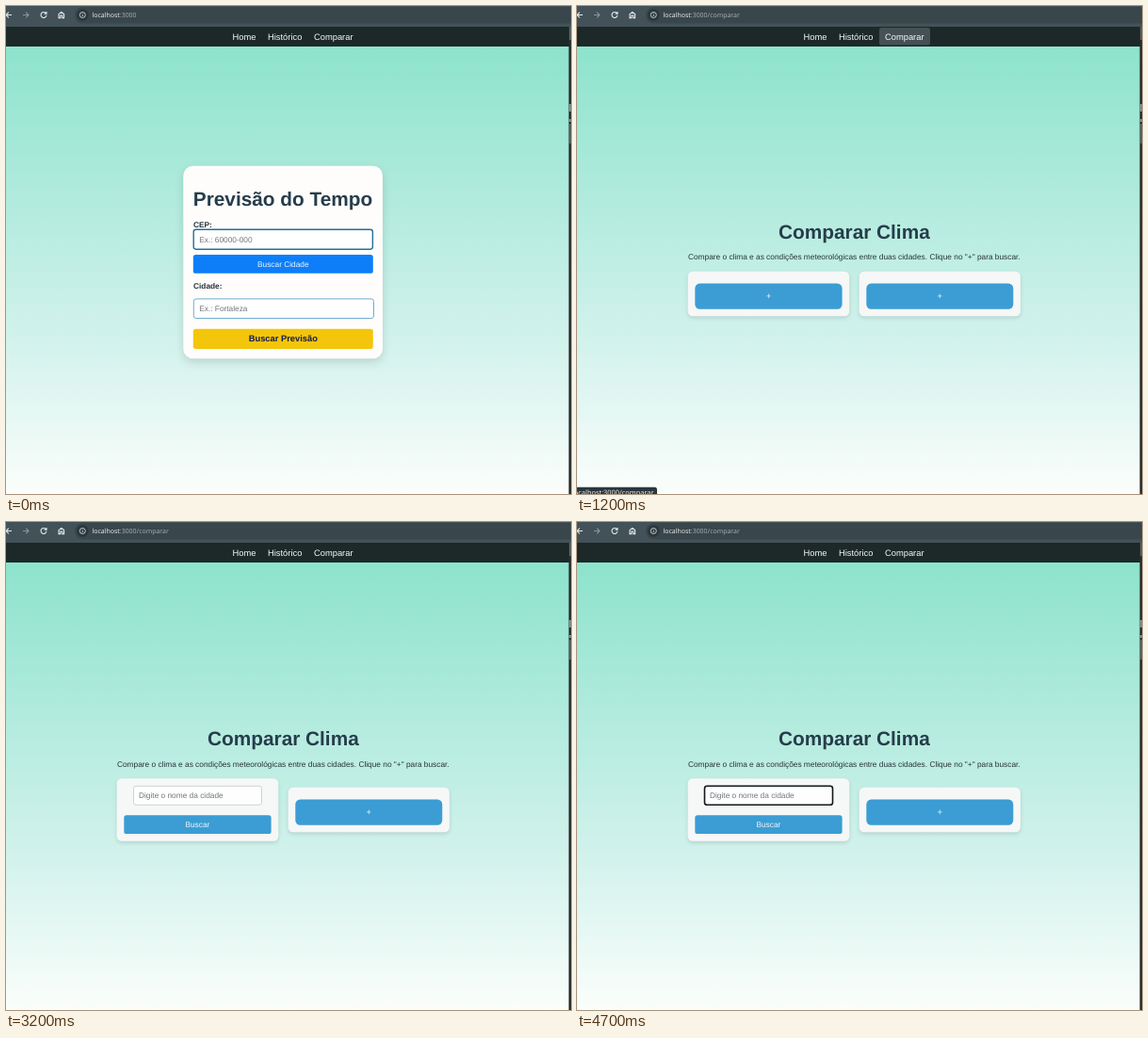
An HTML page for the animation above (5.3 s loop, 600 by 518 pixels).

```html
<!DOCTYPE html>
<html lang="pt-BR">
<head>
<meta charset="utf-8">
<title>Previsão do Tempo</title>
<style>
  html, body { margin: 0; width: 100%; height: 100%; overflow: hidden; background: #fbfefb; }
  svg { display: block; width: 100%; height: 100%; }
  text { font: 8.32px "Liberation Sans", Arial, sans-serif; fill: #263338; text-rendering: geometricPrecision; }
  .title { font-size: 20.8px; font-weight: bold; fill: #263d4b; }
  .nav text { font-size: 9.36px; fill: #f4f8f8; }
  .bold { font-weight: bold; }
  .mid { text-anchor: middle; }
  .hint { fill: #727577; }
  .light { fill: #f1f7fb; }
  .url { font: 6.95px "Noto Sans", "Open Sans", sans-serif; fill: #e6ebed; }
  .icon { fill: none; stroke: #e4eaec; stroke-width: 1.1; }
  .panel { fill: #f6f7f7; filter: drop-shadow(0 2px 2px rgba(0, 0, 0, .12)); }
  .blue { fill: #3b9dd4; }
  .dark { fill: #2f83b3; }
</style>
</head>
<body>
<svg viewBox="0 0 600 518">
  <defs>
    <linearGradient id="sky" x2="0" y2="1">
      <stop offset="0" stop-color="#8de3cc"/>
      <stop offset=".69" stop-color="#d6f3ee"/>
      <stop offset="1" stop-color="#fbfefb"/>
    </linearGradient>
  </defs>
  <rect y="43" width="598" height="475" fill="url(#sky)"/>

  <!-- browser bar -->
  <rect width="600" height="22" fill="#435258"/>
  <rect x="73" y="1" width="560" height="17.5" rx="8.7" fill="#39464b"/>
  <circle cx="81.3" cy="9.5" r="6.3" fill="#2b373c"/>
  <g class="icon">
    <path d="M6 9.5H0M2.8 6.7L0 9.5l2.8 2.8"/>
    <path d="M18 9.5h6M21.2 6.7L24 9.5l-2.8 2.8" stroke="#87959a"/>
    <path d="M42.4 7.6A3 3 0 1 0 43 9.8M43 6v2.3h-2.4"/>
    <path d="M56 8.6L58.8 6.4 61.6 8.6V12.6H59.8V10H57.8V12.6H56Z"/>
    <circle cx="81.3" cy="9.5" r="3" stroke-width=".8"/>
    <path d="M81.3 9.2v1.9M81.3 7.6v.8" stroke-width=".8"/>
  </g>
  <text class="url" x="91.5" y="12">localhost<tspan fill="#a3adb0">:3000<tspan id="path">/comparar</tspan></tspan></text>

  <!-- site menu -->
  <rect y="22" width="598" height="21" fill="#1d2929"/>
  <rect id="menuHover" x="321" y="23" width="54" height="18.5" rx="2.6" fill="#455154"/>
  <g class="nav">
    <text x="240.6" y="35.5">Home</text>
    <text x="278" y="35.5">Histórico</text>
    <text x="327" y="35.5">Comparar</text>
  </g>

  <!-- window edge -->
  <rect x="597.6" y="22" width="2.4" height="496" fill="#2a2d2e"/>
  <path d="M599 22v14M599 125v21" stroke="#555c5e" stroke-width="2"/>
  <path d="M599 104v8M599 120v3" stroke="#9eb4bd" stroke-width="1.4"/>

  <g id="home">
    <rect x="188.3" y="169.7" width="211.7" height="204.6" rx="10.4" fill="#fefdfc" style="filter:drop-shadow(0 4px 5px rgba(0,0,0,.13))"/>
    <text class="title mid" x="294" y="212.4">Previsão do Tempo</text>
    <text class="bold" x="199" y="235">CEP:</text>
    <rect x="199.2" y="237.2" width="190.2" height="21" rx="2.6" fill="#fff" stroke="#246f99" stroke-width="1.4"/>
    <text class="hint" x="205.2" y="250.5">Ex.: 60000-000</text>
    <rect x="198.8" y="264" width="191" height="19.8" rx="2.6" fill="#0d7ef8"/>
    <text class="light mid" x="294.3" y="276.6">Buscar Cidade</text>
    <text class="bold" x="199" y="300.4">Cidade:</text>
    <rect x="199.3" y="310.9" width="191.2" height="20.6" rx="2.6" fill="#fff" stroke="#6caed2"/>
    <text class="hint" x="205.2" y="324.2">Ex.: Fortaleza</text>
    <rect x="198.8" y="342.7" width="191" height="21.2" rx="2.6" fill="#f3c60b"/>
    <text class="bold mid" x="294.3" y="356.3" style="font-size:9.36px;fill:#161a4d">Buscar Previsão</text>
  </g>

  <g id="compare">
    <g id="intro">
      <text class="title mid" x="294.4" y="246.6">Comparar Clima</text>
      <text class="mid" x="294.3" y="269.3">Compare o clima e as condições meteorológicas entre duas cidades. Clique no "+" para buscar.</text>
    </g>
    <g id="closed">
      <rect class="panel" x="117.7" y="281.7" width="171.5" height="47.6" rx="5.2"/>
      <rect class="blue" x="125.3" y="294.5" width="156.3" height="27.2" rx="5.2"/>
      <rect class="dark" id="plusHover" x="125.3" y="294.5" width="156.3" height="27.2" rx="5.2"/>
      <text class="light mid" x="203.4" y="311.3" style="font-size:9.36px">+</text>
    </g>
    <g id="open">
      <rect class="panel" x="117.7" y="272.2" width="171.5" height="66.6" rx="5.2"/>
      <rect id="field" x="135.5" y="280.3" width="136" height="20" rx="2.6" fill="#fefefe"/>
      <text class="hint" x="141" y="293.3">Digite o nome da cidade</text>
      <path id="caret" d="M141 286v9" stroke="#111" stroke-width=".7"/>
      <rect class="blue" x="125.3" y="311.3" width="156.3" height="19.8" rx="2.6"/>
      <rect class="dark" id="searchHover" x="125.3" y="311.3" width="156.3" height="19.8" rx="2.6"/>
      <text class="light mid" x="203.4" y="324.1">Buscar</text>
    </g>
    <rect class="panel" x="299.7" y="281.7" width="171.2" height="47.6" rx="5.2"/>
    <rect class="blue" x="307.3" y="294.5" width="156" height="27.2" rx="5.2"/>
    <text class="light mid" x="385.3" y="311.3" style="font-size:9.36px">+</text>
  </g>

  <g id="status">
    <path d="M0 510.8H82.5Q85 510.8 85 513.3V518H0Z" fill="#2a373d"/>
    <text class="url" x="81.5" y="518.6" text-anchor="end" style="font-size:7.4px">localhost:3000/comparar</text>
  </g>
</svg>
<script>
  const LOOP = 5300;
  const el = id => document.getElementById(id);
  const show = (id, on) => el(id).style.display = on ? '' : 'none';
  const fade = (id, opacity) => el(id).style.opacity = opacity;
  const ramp = (t, from, to) => Math.min(1, Math.max(0, (t - from) / (to - from)));
  const pulse = (t, a, b, c, d) => ramp(t, a, b) - ramp(t, c, d);

  function draw(t) {
    const compare = t >= 1200, open = t >= 3200, focus = t >= 4200;
    show('home', !compare);
    show('compare', compare);
    show('path', compare);
    show('closed', !open);
    show('open', open);
    show('caret', focus && t < 4700);
    el('intro').setAttribute('transform', `translate(0 ${open ? -9.4 : 0})`);
    el('field').setAttribute('stroke', focus ? '#11191c' : '#cfd2d3');
    el('field').setAttribute('stroke-width', focus ? 1.6 : 1);

    fade('menuHover', pulse(t, 660, 960, 1300, 1600));
    fade('status', pulse(t, 660, 800, 1550, 1750));
    fade('plusHover', ramp(t, 1600, 1850));
    fade('searchHover', pulse(t, 3350, 3600, 3700, 3920));
  }

  const start = performance.now();
  function tick() {
    draw((performance.now() - start) % LOOP);
    requestAnimationFrame(tick);
  }
  tick();
</script>
</body>
</html>
```
